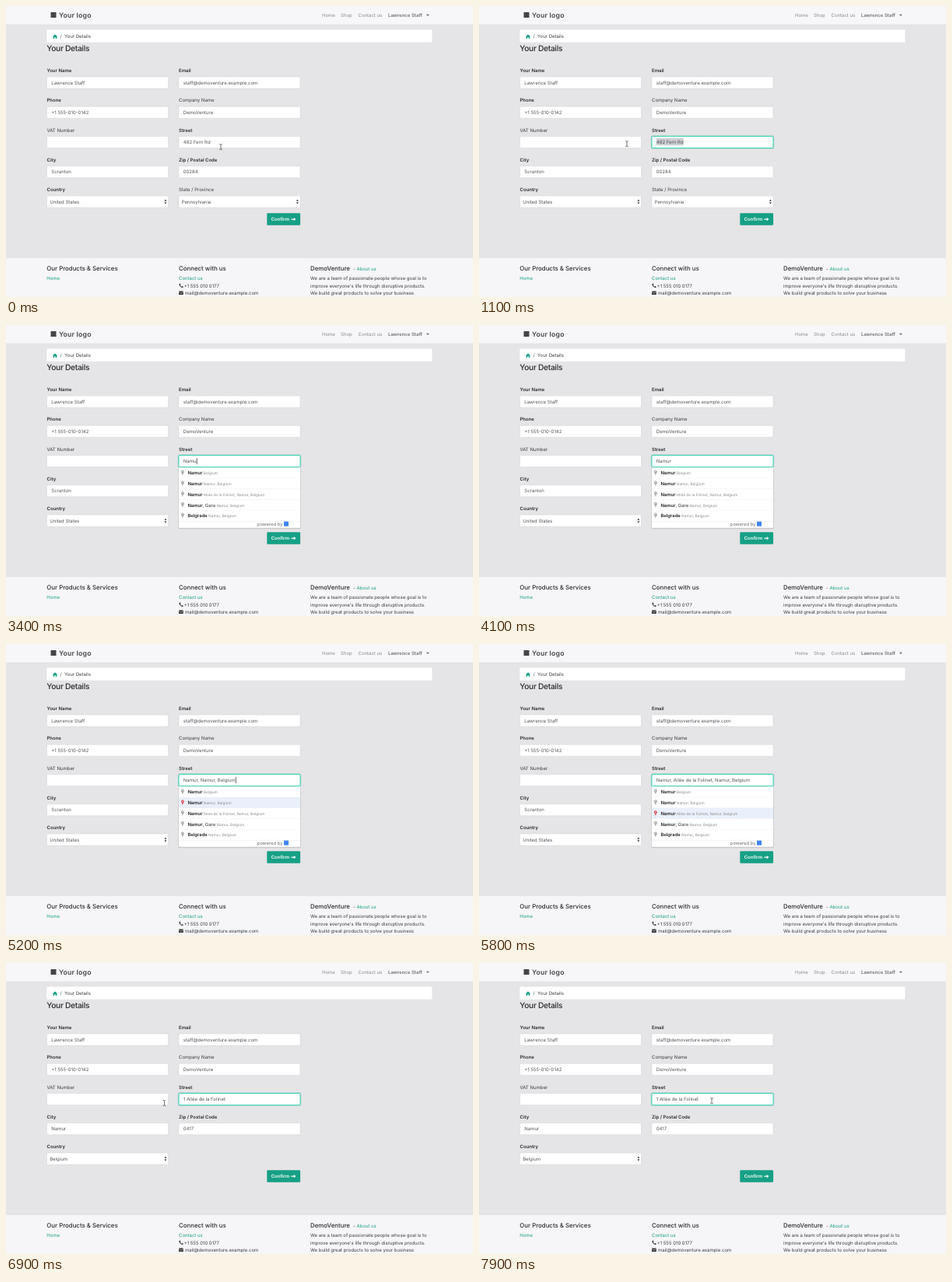
These frames come from a looping animation (600 px wide and 374 px high, 8000 ms). An HTML page:

```html
<!DOCTYPE html>
<html lang="en">
<head>
<meta charset="utf-8">
<title>Your Details</title>
<style>
  html, body { margin: 0; width: 100%; height: 100%; overflow: hidden; background: #e5e4e6; }
  svg { display: block; width: 100%; height: 100%; }
  text { font: 400 6px Inter, "Open Sans", sans-serif; fill: #3c3d40; text-rendering: geometricPrecision; white-space: pre; }
  .bold { font-weight: 600; fill: #2b2b2d; }
  .value { fill: #505256; }
  .nav { fill: #8a898c; }
  .user { font-weight: 600; fill: #727174; }
  .link { fill: #16a085; }
  .logo { font-size: 8.7px; font-weight: 600; fill: #454547; letter-spacing: .2px; }
  .title { font-size: 10.2px; font-weight: 500; fill: #2b2b2d; letter-spacing: -.3px; }
  .foot { font-size: 7.85px; font-weight: 500; fill: #2b2b2d; }
  .button { font-weight: 600; fill: #fff; }
  .hit { font-size: 5.9px; fill: #333; }
  .match { font-weight: 600; fill: #222; }
  .place { font-size: 4.8px; fill: #8c8c8c; }
  .powered { font-size: 5.9px; fill: #6e6e6e; }
</style>
</head>
<body>
<svg id="stage" viewBox="0 0 600 374"></svg>
<script>
const STEP = 100;
const STEPS = 80;
const TEAL = "#16a085";
const ADDRESS = "Allée de la Folinet";
const stage = document.getElementById("stage");

function add(tag, attrs, parent = stage, content = "") {
  const el = document.createElementNS("http://www.w3.org/2000/svg", tag);
  for (const key in attrs) el.setAttribute(key, attrs[key]);
  el.textContent = content;
  parent.appendChild(el);
  return el;
}
const rect = (x, y, width, height, fill, parent, more) =>
  add("rect", { x, y, width, height, fill, ...more }, parent);
const text = (x, y, content, cls = "", parent = stage) =>
  add("text", { x, y, class: cls }, parent, content);
const path = (d, fill, parent, more) => add("path", { d, fill, ...more }, parent);
const show = (el, on) => el.setAttribute("visibility", on ? "visible" : "hidden");

// Header and breadcrumb
rect(0, 0, 600, 374, "#e5e4e6");
rect(0, 0, 600, 23.5, "#f7f6f8");
rect(57.5, 8, 7, 7, "#454547");
text(68, 14.6, "Your logo", "logo");
text(406, 13.8, "Home", "nav");
text(430, 13.8, "Shop", "nav");
text(452.5, 13.8, "Contact us", "nav");
text(491, 13.8, "Lawrence Staff", "user");
path("M539.8 10.7h4.2l-2.1 2.2z", "#727174");
rect(52.4, 30.4, 495, 16.3, "#fff", stage, { rx: 1.2 });
path("M60 39.2 63 36.4 66 39.2 65.3 39.6V41.9H63.7V40H62.3V41.9H60.7V39.6z", TEAL);
text(69.4, 41.4, "/", "value");
text(75, 41.4, "Your Details");
text(52.3, 58.4, "Your Details", "title");

// Form
const COLS = [52.5, 222];
const rowTop = row => 91 + row * 38.25;

function field(col, row, label, value, { bold = true, select = false } = {}) {
  const g = add("g", {});
  const x = COLS[col], y = rowTop(row);
  text(x, y - 5.8, label, bold ? "bold" : "", g);
  const box = rect(x, y, 156, 15, "#fff", g, { rx: 1.3, stroke: "#d0d1d4", "stroke-width": .5 });
  if (select) {
    const a = x + 152.4, m = y + 7.5;
    path(`M${a - 1.5} ${m - .7}h3l-1.5 -2.2zM${a - 1.5} ${m + .7}h3l-1.5 2.2z`, "#343a40", g);
  }
  const out = text(x + (select ? 3.7 : 5.8), y + 9.7, value, "value", g);
  return { g, box, out };
}

field(0, 0, "Your Name", "Lawrence Staff");
field(1, 0, "Email", "staff@demoventure.example.com");
field(0, 1, "Phone", "+1 555-010-0142");
field(1, 1, "Company Name", "DemoVenture", { bold: false });
field(0, 2, "VAT Number", "", { bold: false });
const street = field(1, 2, "Street", "");
const city = field(0, 3, "City", "");
const zip = field(1, 3, "Zip / Postal Code", "");
const country = field(0, 4, "Country", "", { select: true });
const state = field(1, 4, "State / Province", "Pennsylvania", { bold: false, select: true });

const ring = add("rect", {
  x: 221.5, y: rowTop(2) - .5, width: 157, height: 16, rx: 1.8,
  fill: "none", stroke: TEAL, "stroke-opacity": .25, "stroke-width": 1.5
}, street.g);
const mark = rect(0, 169.9, 0, 9.2, "#cbced4");
street.g.insertBefore(mark, street.out);
const caret = rect(0, 171, .7, 8, "#222", street.g);

rect(335.3, 266.2, 42.8, 15.6, TEAL, stage, { rx: 1.3 });
text(340.7, 276.2, "Confirm", "button");
path("M366.4 273.5h3.4v-1.5l2.7 2.1-2.7 2.1v-1.5h-3.4z", "#fff");

// Footer
rect(0, 324, 600, 50, "#f6f5f7");
text(52.3, 340, "Our Products & Services", "foot");
text(52.3, 352.3, "Home", "link");
text(222, 340, "Connect with us", "foot");
text(222, 352.3, "Contact us", "link");
path("M222.6 357.2q.8-.9 1.3-.4l.6 1.2-.7.9q.7 1.3 1.8 1.8l.9-.7 1.2.7q.3.5-.5 1.2-1.5.6-3.4-1.3t-1.2-3.4z", "#333");
text(228.7, 361.6, "+1 555 010 0177");
rect(222, 366.4, 5.8, 4.6, "#333", stage, { rx: .5 });
path("M222.2 367.5l2.7 1.9 2.7-1.9", "none", stage, { stroke: "#f6f5f7", "stroke-width": .6 });
text(230, 371, "mail@demoventure.example.com");
text(391, 340, "DemoVenture", "foot");
text(446, 340, "-");
text(450.4, 340, "About us", "link");
["We are a team of passionate people whose goal is to",
 "improve everyone's life through disruptive products.",
 "We build great products to solve your business"
].forEach((line, i) => text(391, 352.3 + i * 9.35, line));

// Suggestions
const menu = add("g", {});
rect(221.6, 184, 157, 78.2, "#000", menu, { opacity: .12, rx: 1 });
rect(221.8, 183.2, 156.4, 77.8, "#fff", menu, { stroke: "#c4c4c6", "stroke-width": .5 });
const hits = [
  ["Namur", "", "Belgium"],
  ["Namur", "", "Namur, Belgium"],
  ["Namur", "", ADDRESS + ", Namur, Belgium"],
  ["Namur", ", Gare", "Namur, Belgium"],
  ["Belgrade", "", "Namur, Belgium"]
].map(([match, rest, place], i) => {
  const y = 183.4 + i * 13.75;
  const back = rect(222, y, 156, 13.6, "#fff", menu);
  rect(222, y + 13.5, 156, .45, "#e3e3e3", menu);
  const pin = path(`M226.9 ${y + 10.4}q-.3-2.6-1.4-3.8a2 2 0 1 1 2.8 0q-1.1 1.2-1.4 3.8z`, "#a3a3a3", menu);
  add("circle", { cx: 226.9, cy: y + 5.1, r: .7, fill: "#fff" }, menu);
  const line = text(233.4, y + 8.9, "", "hit", menu);
  add("tspan", { class: "match" }, line, match);
  if (rest) add("tspan", {}, line, rest);
  add("tspan", { class: "place", dx: 1.3 }, line, place);
  return { back, pin };
});
text(322.8, 257.6, "powered by", "powered", menu);
rect(357, 252.6, 6, 6, "#4285f4", menu);

const pointer = path("M-1.8-3.4Q0-3.4 0-2.4Q0-3.4 1.8-3.4M0-2.4V2.6M-1.8 3.6Q0 3.6 0 2.6Q0 3.6 1.8 3.6",
  "none", stage, { stroke: "#444", "stroke-width": .75 });

// Timeline in tenths of a second: each row holds from its time on
const STREET = [
  [0, "482 Fern Rd"], [30, "N"], [31, "Na"], [33, "Nam"], [34, "Namu"], [36, "Namur"],
  [50, "Namur, Belgium"], [51, "Namur, Namur, Belgium"],
  [53, `Namur, ${ADDRESS}, Namur, Belgium`], [63, "1 " + ADDRESS]
];
const CARET = [[0, 0], [30, 1], [41, 0], [46, 1], [58, 0], [63, 1], [69, 0], [74, 1], [79, 0]];
const MENU = [[0, 0], [34, 1], [60, 0]];
const PICK = [[0, -1], [50, 0], [51, 1], [53, 2]];
const FOCUS = 5, TYPE = 30, FILL = 63, NO_STATE = 65, RETURN = 69;
const MOVE = [
  [0, 276, 181], [4, 263, 175.5], [5, 262, 175.5],
  [9, 184, 176.5], [10, 186, 177], [11, 190, 177], [30, 190, 177],
  [68, 198, 180], [75, 297, 177], [76, 299, 177]
];

const hold = (track, t) => track.filter(k => k[0] <= t).pop()[1];

function glide(track, t) {
  const i = track.findIndex(k => k[0] > t);
  if (i < 0) return track[track.length - 1].slice(1);
  const a = track[i - 1], b = track[i];
  const p = (t - a[0]) / (b[0] - a[0]);
  const e = p * p * (3 - 2 * p);
  return [1, 2].map(n => a[n] + (b[n] - a[n]) * e);
}

function draw(t) {
  const [mx, my] = glide(MOVE, t);
  pointer.setAttribute("transform", `translate(${mx} ${my})`);
  show(pointer, t < TYPE || t >= RETURN);

  const focused = t >= FOCUS;
  show(ring, focused);
  street.box.setAttribute("stroke", focused ? "#35dfbd" : "#d0d1d4");
  street.box.setAttribute("stroke-width", focused ? .9 : .5);

  street.out.textContent = hold(STREET, t);
  const start = 227.8;
  const end = start + street.out.getComputedTextLength();
  caret.setAttribute("x", end + .3);
  show(caret, hold(CARET, t));

  const from = Math.min(end, Math.max(start, mx));
  mark.setAttribute("x", from);
  mark.setAttribute("width", end - from);
  show(mark, focused && t < TYPE);

  const filled = t >= FILL;
  city.out.textContent = filled ? "Namur" : "Scranton";
  zip.out.textContent = filled ? "0417" : "00284";
  country.out.textContent = filled ? "Belgium" : "United States";
  show(state.g, t < NO_STATE);

  show(menu, hold(MENU, t));
  const pick = hold(PICK, t);
  hits.forEach(({ back, pin }, i) => {
    back.setAttribute("fill", i === pick ? "#e9f0fb" : "#fff");
    pin.setAttribute("fill", i === pick ? "#dc4b55" : "#a3a3a3");
  });
}

const began = performance.now();
let last = -1;
function tick() {
  const t = Math.floor((performance.now() - began) / STEP) % STEPS;
  if (t !== last) draw(last = t);
  requestAnimationFrame(tick);
}
tick();
</script>
</body>
</html>
```
